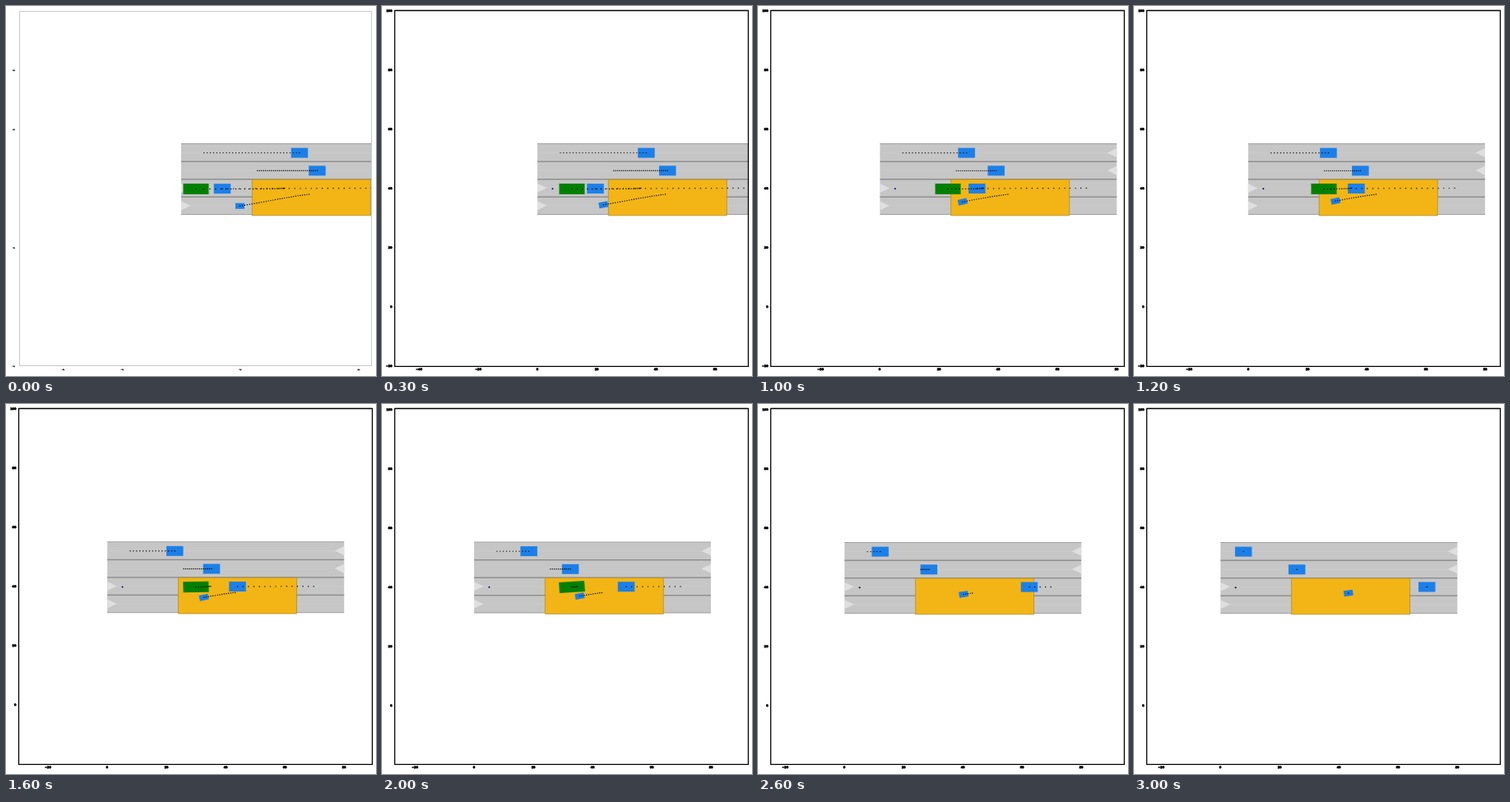
An HTML page with a canvas that plays this animation: 450 by 450 pixels, repeating every 3100 ms.

```html
<!DOCTYPE html>
<html lang="en">
<head>
<meta charset="utf-8">
<title>Lane simulation</title>
<style>
html, body { margin: 0; width: 100%; height: 100%; overflow: hidden; background: #fff; }
canvas { display: block; width: 450px; height: 450px; }
</style>
</head>
<body>
<canvas id="stage" width="450" height="450"></canvas>
<script>
const ctx = document.getElementById('stage').getContext('2d');
const STEP = 100, STEPS = 31, LAST = STEPS - 1, EGO_END = 24;
const CENTER = { x: 231, y: 222.5 };
const ROAD = { w: 288, top: 167.6, lane: 21.5 };
const ZONE = [86.3, 211, 144, 43.8];
const TICK = 72; // 20 units

// x is measured from the start of the road, k counts steps
const car = (x, y, deg = () => 0, w = 20.5, h = 12) =>
  ({ x, y, deg, w, h, color: '#1c7fe8', end: LAST });

const cars = [
  car(k => 144 - 3.87 * k, () => 178.6),
  car(k => 165.5 - 2.42 * k, () => 200.3),
  car(k => 50 + 6.85 * k - 0.005 * k * k, k => 222.2 - 0.7 * k / LAST),
  car(
    k => 71.5 + 2.95 * k - 0.005 * k * k,
    k => {
      const u = k / LAST;
      return 243.2 - 14.2 * (u + 0.3 * u * u * (1 - u));
    },
    k => -16.5 * (1 - Math.exp(-k / 3)) * (1 - 0.55 * k / LAST),
    11, 7)
];

// Brakes evenly after a brisk start and swerves late
const ego = {
  x: k => 18 + 7.85 * k - 0.14 * k * k + 2.5 * k * Math.exp(-k / 2),
  y: k => CENTER.y - (k / EGO_END) ** 4,
  deg: k => -10 * (k / EGO_END) ** 5,
  w: 31, h: 13, color: '#008000', end: EGO_END
};

function rect(x, y, w, h, color) {
  ctx.fillStyle = color;
  ctx.fillRect(x, y, w, h);
}

function dot(x, y, r = 0.7, color = '#000') {
  ctx.fillStyle = color;
  ctx.beginPath();
  ctx.arc(x, y, r, 0, 2 * Math.PI);
  ctx.fill();
}

function arrow(x, y, dir) {
  ctx.fillStyle = '#dfdfdf';
  ctx.beginPath();
  ctx.moveTo(x, y - 5.5);
  ctx.lineTo(x + 11.5 * dir, y);
  ctx.lineTo(x, y + 5.5);
  ctx.fill();
}

function drawRoad() {
  const { w, top, lane } = ROAD;
  rect(0, top, w, lane * 4, '#c6c6c6');
  for (let i = 0; i < 4; i++) {
    const mid = top + lane * (i + 0.5);
    rect(0, mid - 0.5, w, 1, '#cbcbcb');
    if (i < 2) arrow(w, mid, -1);
    else arrow(0, mid, 1);
  }
  for (let i = 0; i <= 4; i++) {
    const inner = i % 4 > 0;
    rect(0, top + lane * i - 0.6, w, inner ? 1.4 : 1, inner ? '#8c8c8c' : '#a0a0a0');
  }
  rect(...ZONE, '#f2b515');
  ctx.strokeStyle = '#b0902f';
  ctx.lineWidth = 0.8;
  ctx.strokeRect(...ZONE);
}

function drawBody(body, k) {
  ctx.save();
  ctx.translate(body.x(k), body.y(k));
  ctx.rotate(body.deg(k) * Math.PI / 180);
  rect(-body.w / 2, -body.h / 2, body.w, body.h, body.color);
  ctx.restore();
}

function drawPath(body, k) {
  for (let i = k; i <= body.end; i++) dot(body.x(i), body.y(i));
}

function drawAxes(left, shift, faint) {
  ctx.strokeStyle = faint ? '#c8c8c8' : '#000';
  ctx.lineWidth = faint ? 1 : 1.3;
  if (faint) ctx.strokeRect(16.5, 6.5, 428, 431);
  else ctx.strokeRect(15.5, 5.5, 430, 432.9);

  ctx.fillStyle = ctx.strokeStyle = '#000';
  ctx.font = `bold ${faint ? 2 : 3.4}px "DejaVu Sans", sans-serif`;
  ctx.lineWidth = faint ? 0.2 : 0.8;
  ctx.lineJoin = 'round';
  ctx.textBaseline = 'middle';
  const label = (v, x, y) => {
    if (faint && [0, 40, 100].includes(v)) return;
    const text = String(v).replace('-', '\u2212');
    ctx.strokeText(text, x, y);
    ctx.fillText(text, x, y);
  };
  ctx.textAlign = 'center';
  for (let n = -2; n <= 4; n++) {
    const x = Math.round(left + n * TICK);
    if (x >= 16 && x <= 445) label(n * 20, x, 442.5);
  }
  ctx.textAlign = 'right';
  for (let n = -1; n <= 5; n++) {
    const y = 366.3 - n * TICK + shift;
    if (y <= 438.4) label(n * 20, faint ? 11 : 12.3, Math.round(y) + 0.5);
  }
}

function draw(k) {
  const seen = Math.min(k, EGO_END), egoOn = k <= EGO_END;
  const left = CENTER.x - ego.x(seen), shift = CENTER.y - ego.y(seen);
  rect(0, 0, 450, 450, '#fff');

  ctx.save();
  ctx.beginPath();
  ctx.rect(16, 6, 429, 432);
  ctx.clip();
  ctx.translate(left, shift);
  drawRoad();
  dot(18.4, 222.3, 1, egoOn ? '#00007a' : '#000');
  cars.forEach(c => drawBody(c, k));
  if (egoOn) drawBody(ego, k);
  [...cars, ego].forEach(b => drawPath(b, k));
  ctx.restore();

  drawAxes(left, shift, k === 0);
}

const start = performance.now();
let shown = -1;
function tick() {
  const k = Math.floor(Math.max(0, performance.now() - start) / STEP) % STEPS;
  if (k !== shown) draw(shown = k);
  requestAnimationFrame(tick);
}
tick();
</script>
</body>
</html>
```
